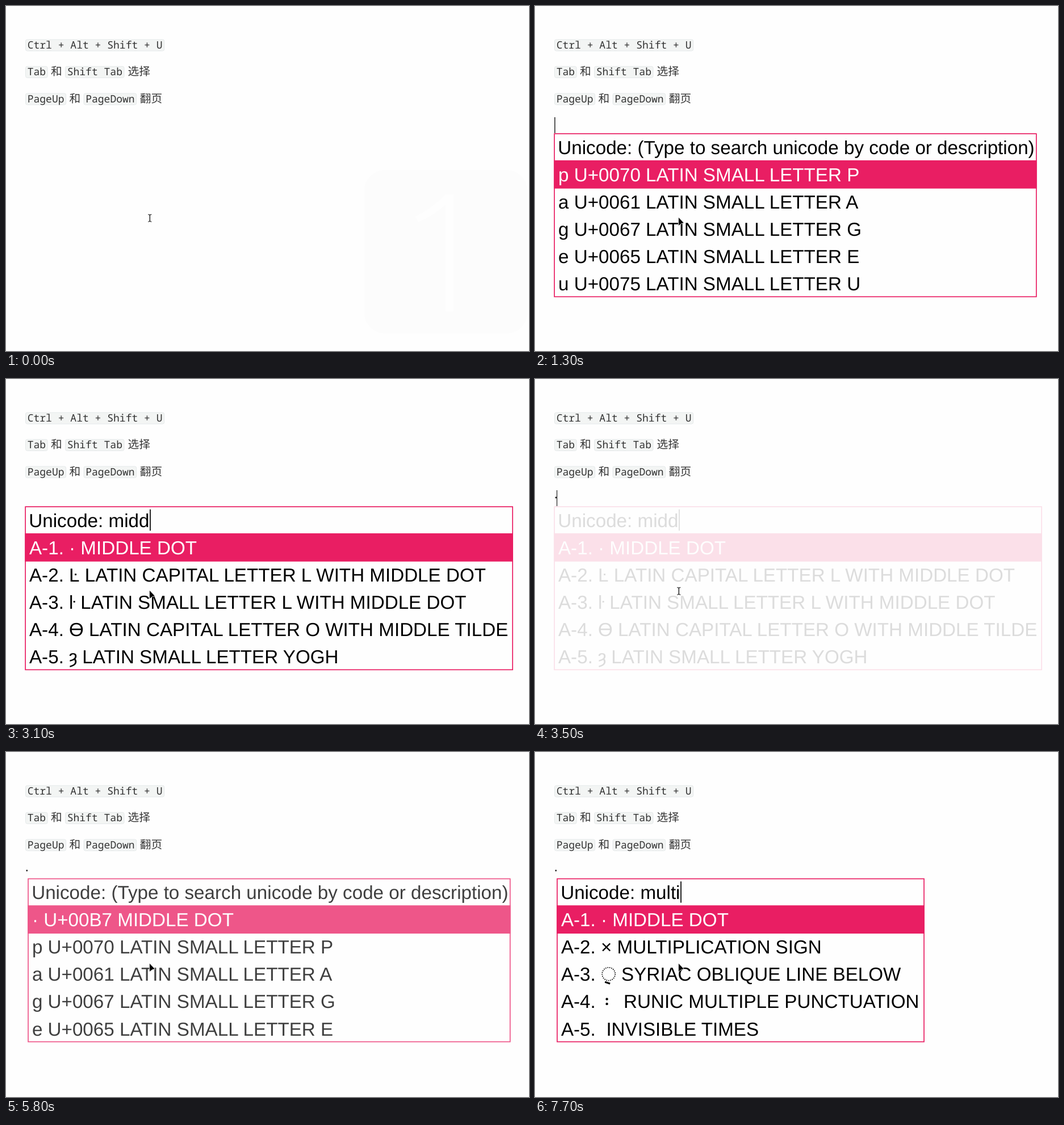
An HTML page that plays this animation: 921 by 608 pixels, repeating every 8000 ms.

```html
<!DOCTYPE html>
<html lang="zh-CN">
<head>
<meta charset="utf-8">
<style>
  html, body { margin: 0; width: 100%; height: 100%; overflow: hidden; background: #fefefe; }
  svg { display: block; text-rendering: geometricPrecision; }
  .code { font: 18.03px "Noto Sans Mono", "DejaVu Sans Mono", monospace; fill: #333; }
  .han { font: 19.7px "Noto Sans CJK SC", "Noto Sans CJK", sans-serif; fill: #333; }
  .key { fill: #f3f5f4; stroke: #e5e9ea; }
  #popup { font: 33.2px "Liberation Sans", Arial, sans-serif; }
</style>
</head>
<body>
<svg width="921" height="608" viewBox="0 0 921 608">
  <g id="badge">
    <rect x="631" y="289" width="287" height="288" rx="36" fill="#fcfcfc"/>
    <path d="M774 332H788V538H774V350Q752 370 726 381L721 371Q752 356 774 332Z" fill="#fefefe"/>
  </g>
  <g id="help"></g>
  <circle id="dot" cx="36.8" cy="209" r="1.4" fill="#222"/>
  <rect id="caret" y="196" height="28" fill="#222"/>
  <g id="popup"></g>
  <g id="beam" fill="none" stroke-linecap="round">
    <path d="M251 367.5Q253 367.5 253.3 369Q253.6 367.5 255.6 367.5M253.3 369V378.5M251 380Q253 380 253.3 378.5Q253.6 380 255.6 380" stroke="#e4e4e4" stroke-width="3"/>
    <path d="M251 367.5Q253 367.5 253.3 369Q253.6 367.5 255.6 367.5M253.3 369V378.5M251 380Q253 380 253.3 378.5Q253.6 380 255.6 380" stroke="#111" stroke-width="1.2"/>
  </g>
  <path id="arrow" d="M252.5 372L262.5 382.5L258 383.5L252.5 387.5Z" fill="#000" stroke="#fff" stroke-width=".8"/>
</svg>
<script>
const $ = id => document.getElementById(id);
const LOOP = 8000, ROW = 48.15, PINK = '#e91e63';

// Static help lines: x, baseline, text
const key = (x, y, s) =>
  `<rect class="key" x="${x}" y="${y - 15.5}" width="${s.length * 10.82 + 6.2}" height="20" rx="3"/>
   <text class="code" x="${x + 3.2}" y="${y}">${s}</text>`;
const han = (x, y, s) => `<text class="han" x="${x}" y="${y}">${s}</text>`;
$('help').innerHTML = [
  key(34.5, 74.6, 'Ctrl + Alt + Shift + U'),
  key(34.5, 121.9, 'Tab'), han(79, 121.9, '和'), key(104.5, 121.9, 'Shift Tab'), han(214.6, 121.9, '选择'),
  key(34.5, 169.5, 'PageUp'), han(111.6, 169.5, '和'), key(137, 169.5, 'PageDown'), han(235.8, 169.5, '翻页')
].join('');

// A row is a string, or [lead, x of the rest, rest, icon]
const recent = [...'pageu'].map(c =>
  `${c} U+00${c.charCodeAt().toString(16)} LATIN SMALL LETTER ${c.toUpperCase()}`);
const lists = {
  first: { w: 850.4, rows: recent },
  again: { w: 850.4, rows: ['· U+00B7 MIDDLE DOT', ...recent.slice(0, 4)] },
  single: { w: 504.6, rows: ['A-1. m LATIN SMALL LETTER M'] },
  middle: { w: 859.7, rows: [
    'A-1. · MIDDLE DOT',
    'A-2. Ŀ LATIN CAPITAL LETTER L WITH MIDDLE DOT',
    ['A-3. ŀ', 98, 'LATIN SMALL LETTER L WITH MIDDLE DOT'],
    'A-4. Ɵ LATIN CAPITAL LETTER O WITH MIDDLE TILDE',
    ['A-5. ȝ', 101, 'LATIN SMALL LETTER YOGH']] },
  multiple: { w: 647.7, rows: [
    'A-1. · MIDDLE DOT',
    'A-2. × MULTIPLICATION SIGN',
    ['A-3.', 113.8, 'SYRIAC OBLIQUE LINE BELOW',
      '<circle cx="91.5" cy="-12" r="11.5" fill="none" stroke="#000" stroke-width="1.7" stroke-dasharray="1.6 1.84"/><path d="M85 2L94 5" stroke="#000" stroke-width="3"/>'],
    ['A-4.', 117.8, 'RUNIC MULTIPLE PUNCTUATION',
      '<circle cx="88.4" cy="-16" r="2.2"/><circle cx="88.4" cy="-7.5" r="2.2"/>'],
    ['A-5.', 87.2, 'INVISIBLE TIMES']] }
};

// [start, list, typed text, opacity]
const HINT = '(Type to search unicode by code or description)';
const steps = [
  [0],
  [500, 'first', '', .35], [600, 'first', '', .75], [700, 'first', '', 1],
  [1500, 'single', 'm', 1], [1600, 'middle', 'mi', 1], [1800, 'middle', 'mid', 1], [2000, 'middle', 'midd', 1],
  [3300, 'middle', 'midd', .8], [3400, 'middle', 'midd', .45],
  [3500, 'middle', 'midd', .13], [3600, 'middle', 'midd', .03], [3700],
  [5700, 'again', '', .35], [5800, 'again', '', .75], [5900, 'again', '', 1],
  [6700, 'single', 'm', 1], [6900, 'multiple', 'mu', 1], [7200, 'multiple', 'mul', 1],
  [7500, 'multiple', 'mult', 1], [7600, 'multiple', 'multi', 1]
];
const blinks = [100, 700, 1300, 1900, 2500, 3100, 3500, 4100, 4700, 5300, 5900, 6500, 7100, 7700];

const label = (x, s) => `<text x="${x}">${s}</text>`;
const line = (i, body, color = '#000') =>
  `<g transform="translate(0 ${36.2 + ROW * i})" fill="${color}">${body}</g>`;

function drawPopup([, name, typed, opacity], afterDot) {
  const popup = $('popup');
  popup.innerHTML = '';
  if (!name) return;
  const { w, rows } = lists[name], h = ROW * (rows.length + 1);
  popup.setAttribute('transform', afterDot ? 'translate(38.2 222.6)' : 'translate(33.3 224.3)');
  popup.setAttribute('opacity', opacity);
  popup.innerHTML =
    `<rect x=".85" y=".85" width="${w - 1.7}" height="${h - 1.7}" fill="#fefefe" stroke="${PINK}" stroke-width="1.7"/>
     <rect y="${ROW - .5}" width="${w}" height="${ROW + (rows[1] ? 1.6 : .5)}" fill="${PINK}"/>` +
    line(0, label(7, 'Unicode: ' + (typed || HINT))) +
    rows.map((row, i) => {
      const [lead, x, rest, icon = ''] = [].concat(row);
      return line(i + 1, label(7.7, lead) + (rest ? label(x, rest) : '') + icon, i ? '#000' : '#fff');
    }).join('');
  if (typed) {
    const x = 7.7 + popup.querySelector('text').getComputedTextLength();
    popup.insertAdjacentHTML('beforeend', `<rect x="${x}" y="5.5" width="1.7" height="37.5"/>`);
  }
}

const show = (id, on) => $(id).style.display = on ? '' : 'none';
let shown;

function frame() {
  const t = performance.now() % LOOP;
  const step = steps.findLast(s => s[0] <= t);
  const typedDot = t >= 3500;
  if (step !== shown) drawPopup(shown = step, t >= 3700);

  const arrow = t >= 300 && t < 500 ||
    step[1] && step[1] !== 'single' && !(t >= 3300 && t < 3700);
  show('arrow', arrow);
  show('beam', !arrow);
  show('badge', t < 500);
  show('dot', typedDot);
  show('caret', blinks.filter(b => b <= t).length % 2);
  $('caret').setAttribute('x', typedDot ? 38 : 34.2);
  $('caret').setAttribute('width', typedDot ? 1.2 : 1.5);
  requestAnimationFrame(frame);
}
frame();
</script>
</body>
</html>
```
